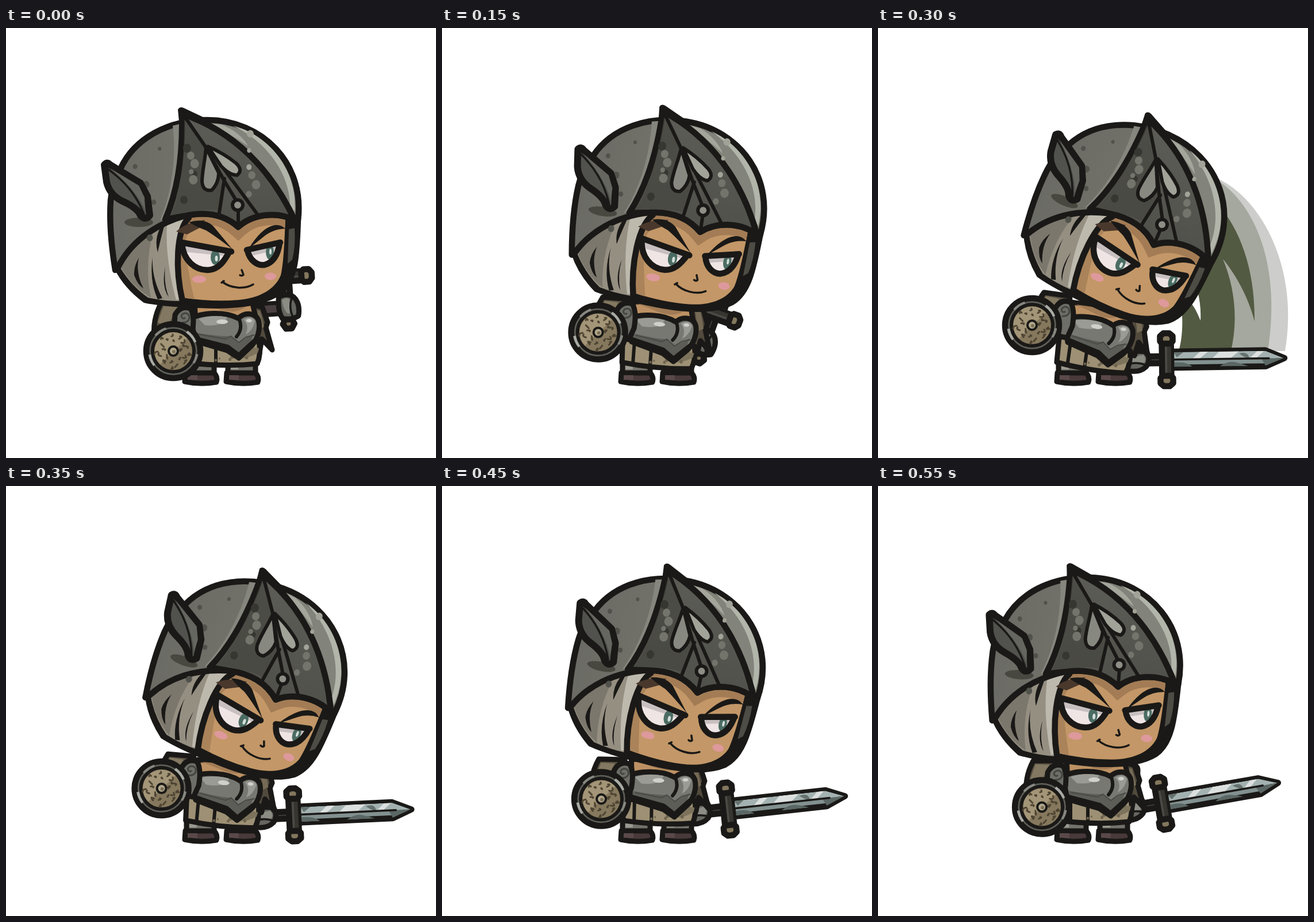
Recreate the animation shown at these times as an HTML page. Size 748 px wide and 748 px high, loop 600 ms.

```html
<!DOCTYPE html>
<html lang="en">
<head>
<meta charset="utf-8">
<title>Knight sword swing</title>
<style>
  html, body { margin: 0; width: 100%; height: 100%; overflow: hidden; background: #fff; }
  svg { display: block; width: 100vw; height: 100vh; }
  .o { stroke: #1a1917; stroke-width: var(--w, 9px); stroke-linejoin: round; stroke-linecap: round; }
  .l { fill: none; }
  .m { --w: 6px; }
  .s { --w: 3.5px; }
  .k { fill: #1a1917; }
  #head, #shield, #sword { --w: 10.5px; }
</style>
</head>
<body>
<svg viewBox="0 0 748 748">
  <defs>
    <linearGradient id="dome"><stop stop-color="#6b6b65"/><stop offset="1" stop-color="#7b7b71"/></linearGradient>
    <linearGradient id="crestFill" x2="0" y2="1"><stop stop-color="#5c5d56"/><stop offset="1" stop-color="#4f504a"/></linearGradient>
    <clipPath id="face"><path d="M318 325C296 350 295 420 307 469Q360 477 405 473C440 470 468 455 478 430Q484 405 486 325Z"/></clipPath>
    <clipPath id="bladeClip"><path d="M12-13H172L204 0L172 13H12Z"/></clipPath>
    <clipPath id="leftEye"><path d="M306 374C308 405 330 422 352 421C370 420 380 405 388 390Z"/></clipPath>
    <clipPath id="rightEye"><path d="M419 387C424 405 438 414 450 412C465 408 473 395 476 374Z"/></clipPath>
  </defs>

  <g id="slash">
    <path fill="#cdcecb" d="M588 261C660 290 734 410 708 562H600Z"/>
    <path fill="#a5a89e" d="M580 258C655 300 702 410 678 562H560Z"/>
    <path fill="#525a42" d="M590 305C630 350 656 420 655 510C645 470 622 428 600 402C620 450 627 505 614 562H523C530 540 532 500 525 470L540 475C550 482 555 495 561 509C562 490 560 475 556 458Z"/>
  </g>

  <g id="sword">
    <path class="o" fill="#45443f" d="M-78-6H0V6H-78Z"/>
    <path class="o" fill="#7d7159" d="M-90-5L-82-10L-74-6V6L-82 10L-90 5Z"/>
    <path class="o" fill="#82918f" d="M8-14H172L205 0L172 14H8Z"/>
    <g clip-path="url(#bladeClip)">
      <path fill="#a3b2b1" d="M12-13H172L204 0H12Z"/>
      <path fill="#dce0df" d="M44 0L58-13H72L56 0ZM78 0L92-13H126L110 0ZM144 0L158-13H170L155 0Z"/>
      <path fill="#5b6764" d="M12 5Q35 3 45 13H12ZM92 13Q106 3 119 6T142 13ZM165 0L204 0L172 13Z"/>
      <path fill="#66726f" d="M12-13H30L18-4ZM126-9Q140-13 143-4T126-9Z"/>
      <path class="o l s" d="M12 0H178"/>
    </g>
    <path class="o" fill="#4b4a45" d="M-8-34H8V34H-8Z"/>
    <path fill="#36352f" d="M1-30H8V30H1Z"/>
    <path id="cap" class="o" fill="#83775d" d="M-11-41L-5-46H5L11-41V-32L7-28H-7L-11-32Z"/>
    <use href="#cap" transform="scale(1 -1)"/>
  </g>

  <g id="arm">
    <path id="armEdge" class="o l" style="--w:27px"/>
    <path id="armFill" class="l" stroke="#493f41" stroke-width="13" stroke-linecap="round"/>
    <g id="hand">
      <path class="o" fill="#65665f" d="M-14-20Q2-27 12-18Q23-6 18 15Q7 22-10 18Q-18 5-14-20Z"/>
      <path fill="#8b8c84" d="M-9-14Q0-20 5-14L3 10Q-5 12-9-14Z"/>
      <path class="o l s" d="M8-16Q2 0 8 16"/>
    </g>
  </g>

  <g id="cape">
    <path class="o" fill="#5b5344" d="M270 478L315 478L330 550L259 545Q253 510 270 478Z"/>
    <path fill="#837861" d="M274 484L298 485L281 520L264 512Z"/>
    <path class="o" fill="#514a3d" d="M425 480L446 486L455 512L452 521L463 560L445 541L441 565L420 555Z"/>
    <path fill="#756a55" d="M432 490L442 492L449 520L440 525Z"/>
  </g>

  <g id="legs">
    <g id="leg">
      <path class="o" fill="#73736b" d="M314 565H362V601H314Z"/>
      <path fill="#9a9a91" d="M319 573H332V594H319Z"/>
      <path class="o" fill="#49393b" d="M312 600H362Q369 607 366 616Q338 621 311 615Z"/>
      <path fill="#5b494a" d="M316 604H333V612H316Z"/>
    </g>
    <use href="#leg" x="72"/>
  </g>

  <g id="torso">
    <path class="o" fill="#bd9163" d="M328 475H428L437 515H330Z"/>
    <path fill="#a17b55" d="M335 478H425Q405 500 373 490Z"/>
    <path class="o" fill="#9d9074" d="M314 536L440 545Q444 568 437 584Q380 590 316 582Z"/>
    <path fill="#7d735c" d="M338 544L440 557L438 565Q405 585 385 566Z"/>
    <path class="o l m" d="M365 550V584M335 545V582"/>
    <g id="skirtSpots"></g>
    <path class="o" fill="#777872" d="M321 506C340 494 382 493 404 505C417 493 434 496 439 508C444 525 436 542 429 551L405 574L385 561L330 545Z"/>
    <path fill="#5c5d57" d="M331 530Q370 537 392 536L405 547L430 532L425 549L405 564L385 552L332 541Z"/>
    <path class="o l m" d="M331 540L386 554L405 568L431 544M405 505Q413 523 401 537"/>
    <path class="l" stroke="#494a45" stroke-width="2" d="M336 533L382 541L391 536L405 547L417 538L432 534"/>
    <path fill="#9a9b94" d="M335 506Q360 498 385 503Q378 520 346 517ZM413 507Q428 499 433 510Q429 527 417 533Q424 518 413 507Z"/>
    <g fill="#d0d0ca"><ellipse cx="376" cy="511" rx="10" ry="4"/><ellipse cx="423" cy="509" rx="5" ry="3"/></g>
  </g>

  <g id="shoulder">
    <path class="o" fill="#6d6e67" d="M291 545L294 499Q304 481 321 488Q329 501 324 530L315 550Z"/>
    <path class="l" stroke="#44453f" stroke-width="3" d="M306 512C323 514 322 495 311 496C301 498 306 509 312 504"/>
  </g>

  <g id="shield">
    <circle class="o" r="47" fill="#5d5e58"/>
    <path class="l" stroke="#a9aba5" stroke-width="7" d="M23-33A40 40 0 0 1 37-15M-40 6A40 40 0 0 0-32 24"/>
    <path class="l" stroke="#868780" stroke-width="7" d="M-30-26A40 40 0 0 1-12-38M40 5A40 40 0 0 1 34 20"/>
    <circle class="o m" r="36" fill="#85785d"/>
    <path fill="#a39577" d="M-31-10A33 33 0 0 1 24-22L-23 23A33 33 0 0 1-31-10Z"/>
    <path id="vines" class="l" stroke="#4f4533" stroke-width="3" stroke-linecap="round"/>
    <circle class="o" style="--w:4px" r="8" fill="#b2a88c"/>
    <circle cx="1" cy="1" r="3" fill="#7b7058"/>
  </g>

  <g id="head">
    <path class="o k" d="M194 418Q210 449 242 473Q275 480 340 482C400 485 450 478 478 458C503 437 506 400 508 330L330 300L230 340Z"/>
    <path fill="#958f82" d="M198 416C224 370 268 335 317 325C294 365 293 420 304 475Q274 475 247 469Q218 449 198 416Z"/>
    <path fill="#7c776c" d="M200 416Q225 376 257 352Q240 410 252 469Q218 449 200 416Z"/>
    <path fill="#bdb9ad" d="M280 340L315 328C294 365 293 420 304 472L296 473C282 420 278 380 280 340Z"/>
    <path class="k" d="M267 350Q258 370 264 390Q267 375 275 345ZM255 398Q253 435 272 470L264 472Q249 440 255 398ZM231 400Q225 425 239 453Q229 447 223 430Q222 415 231 400ZM277 415Q274 445 283 468Q270 450 277 415Z"/>
    <path fill="#4d4c45" d="M492 350L502 348Q504 380 498 403L490 410Z"/>

    <g clip-path="url(#face)">
      <path fill="#c39767" d="M290 320H510V490H290Z"/>
      <path fill="#aa835a" d="M290 320H330L310 375Q317 430 332 490H290Z"/>
      <path fill="none" stroke="#a37c55" stroke-width="36" d="M310 327C350 318 380 325 404 346C428 324 470 318 502 334"/>
    </g>
    <path class="o l" d="M318 330C296 352 294 420 307 475"/>

    <g clip-path="url(#leftEye)">
      <path fill="#eee5e4" d="M300 365H395V425H300Z"/>
      <path fill="#c8c0c0" d="M300 365L395 385V398L305 389Z"/>
      <ellipse cx="364" cy="399" rx="8" ry="13" fill="#4b6c63"/><ellipse cx="366" cy="401" rx="2.5" ry="5" fill="#d5dfda"/>
    </g>
    <g clip-path="url(#rightEye)">
      <path fill="#eee5e4" d="M415 365H480V415H415Z"/>
      <path fill="#c8c0c0" d="M415 385L480 368V384L420 398Z"/>
      <ellipse cx="459" cy="390" rx="7" ry="13" fill="#4b6c63"/><ellipse cx="460" cy="389" rx="2" ry="5" fill="#d5dfda"/>
    </g>
    <path class="o l" d="M305 373L392 389M306 374C308 405 330 422 352 421C370 420 380 405 388 390M419 386L477 373M420 387C424 405 438 414 450 412C465 408 473 395 476 374"/>
    <path fill="#4a382c" d="M296 354Q315 337 346 334L340 346L315 359Z"/>
    <path class="k" d="M318 338Q344 330 360 344L394 385Q363 361 348 352Q334 347 318 338ZM422 384Q443 350 463 344Q476 340 486 349Q463 350 447 364Z"/>
    <g fill="#dd999b"><ellipse cx="336" cy="437" rx="12" ry="6.5"/><ellipse cx="460" cy="432" rx="10" ry="6.5"/></g>
    <path class="o l s" d="M410 421L413 429Q411 432 407 430M375 443L379 440M377 442C391 453 415 455 430 446"/>

    <path class="o" fill="url(#dome)" d="M190 421C185 390 179 345 182 300C184 278 191 258 199 245C224 190 285 160 350 160C445 160 520 235 508 334L502 334C470 318 428 324 404 346C380 325 350 318 310 327C255 343 215 375 194 418Z"/>
    <path fill="#85867d" d="M290 170L302 167C306 225 298 285 277 331L268 334C287 290 297 230 290 170Z"/>
    <path fill="#82837a" d="M345 165C435 165 502 230 503 322C468 250 412 195 345 165Z"/>
    <path fill="#b2b5aa" d="M395 170C455 185 508 245 502 320L494 308C493 255 456 199 395 170Z"/>
    <path fill="#a4a59b" d="M350 165L375 168Q407 181 421 205Q390 184 350 165Z"/>
    <path class="o" fill="url(#crestFill)" d="M306 148C308 225 298 285 277 333L310 327C350 318 380 325 404 346C428 324 470 318 502 334C470 265 415 192 322 155Z"/>
    <path fill="#454640" d="M310 158L346 205L376 266L370 316Q330 315 287 326C303 290 311 225 310 158Z" opacity=".65"/>
    <g id="headSpots"></g>
    <path class="o l m" d="M310 153L346 205L381 268L404 306V342M380 262L371 321M362 222L438 325"/>
    <path class="o m" fill="#878880" d="M348 208C346 233 341 249 341 268Q343 285 358 282Q370 270 370 252Z"/>
    <path class="o m" fill="#a1a399" d="M351 206Q379 218 400 235Q413 247 402 256Q389 256 374 240Z"/>
    <circle class="o m" cx="403" cy="308" r="9" fill="#8d8e86"/>
    <path class="k" d="M299 142Q302 136 309 139L345 156L312 158L302 172Z"/>
    <ellipse cx="231" cy="338" rx="25" ry="8" fill="#484841"/>
    <path class="o" style="--w:12px" fill="#51524d" d="M171 238Q176 232 181 238L234 270L246 293L250 326Q242 336 234 326Q229 313 202 301Q180 290 175 268Z"/>
    <path fill="#656660" d="M181 244L231 274L241 295L242 317Q227 282 181 244Z"/>
    <path class="o l s" d="M178 246Q222 277 240 324"/>
  </g>
</svg>
<script>
  const $ = id => document.getElementById(id);
  const lerp = (a, b, u) => a + (b - a) * u;
  const clamp = u => Math.min(1, Math.max(0, u));
  const smooth = u => (u = clamp(u)) * u * (3 - 2 * u);

  let seed = 7;
  const random = (a, b) => lerp(a, b, (seed = seed * 16807 % 2147483647) / 2147483647);

  // Spots climb the area in even steps and scatter sideways
  function scatter(id, color, count, x, y, w, h, size) {
    for (let i = 0; i < count; i++) {
      const r = random(.6, 1.3) * size;
      $(id).innerHTML += `<ellipse cx="${x + random(0, w)}" cy="${y + h * i / (count - 1)}" rx="${r}" ry="${r * 1.1}" fill="${color}"/>`;
    }
  }
  scatter('headSpots', '#51524b', 6, 212, 210, 60, 155, 5);
  scatter('headSpots', '#363731', 3, 308, 209, 28, 90, 6);
  scatter('headSpots', '#73746b', 4, 312, 222, 20, 42, 6);
  scatter('headSpots', '#73746b', 3, 415, 256, 22, 33, 6);
  scatter('headSpots', '#a2a398', 3, 405, 184, 60, 58, 5);
  scatter('skirtSpots', '#6d634e', 5, 350, 572, 78, 6, 2.5);

  let vines = '';
  for (let i = 0; i < 22; i++) {
    const turn = i * 2.4, r = 12 + 17 * Math.sqrt(i / 22);
    vines += `M${r * Math.cos(turn)} ${r * Math.sin(turn)}q${random(-8, 8)} ${random(-8, 8)} ${random(-6, 6)} ${random(-6, 6)}`;
  }
  $('vines').setAttribute('d', vines);

  // Sword poses: guard x, y and blade angle
  const raised = [486, 433, -94], wound = [446, 417, -140], struck = [502, 577, -.8], lowered = [494, 552, -10];
  const blend = (a, b, u) => a.map((v, i) => lerp(v, b[i], u));

  function swordPose(t) {
    if (t <= 100) return blend(raised, wound, t / 100);
    if (t <= 200) return blend(wound, struck, (t - 100) / 100);
    return blend(struck, lowered, clamp((t - 300) / 250));
  }

  const move = (id, value) => $(id).setAttribute('transform', value);

  function draw(now) {
    const t = Math.floor(now % 600 / 50) * 50;
    const back = 1 - clamp((t - 300) / 300) ** 1.1;
    const nod = smooth((t - 60) / 210) * back;
    const slide = smooth((t - 20) / 240) * back;
    const lunge = clamp(t / 200) ** .75 * back;
    const lean = lunge ** 3, lift = lunge ** 1.5;
    const [x, y, turn] = swordPose(t);
    const r = turn * Math.PI / 180;
    const hx = x - 54 * Math.cos(r), hy = y - 54 * Math.sin(r);
    const tilt = `translate(${-7 * lean} ${11 * lean}) rotate(${8 * lean} 400 590)`;

    move('head', `translate(${403 + 91 * slide} ${308 + 34 * nod ** 1.4}) rotate(${23.5 * nod}) translate(-403 -308)`);
    move('torso', tilt);
    move('cape', `translate(${9 * lean} ${-12 * lean}) ${tilt}`);
    move('shoulder', `translate(${14 * lift} ${-11 * lift})`);
    move('shield', `translate(${291 - 23 * lunge ** .8} ${562 - 45 * lift})`);
    move('sword', `translate(${x} ${y}) rotate(${turn})`);
    move('hand', `translate(${hx} ${hy}) rotate(${turn + 90})`);
    for (const id of ['armEdge', 'armFill']) $(id).setAttribute('d', `M443 ${490 + 50 * lift}L${hx} ${hy}`);
    $('slash').style.display = t >= 200 && t < 350 ? '' : 'none';
    requestAnimationFrame(draw);
  }
  draw(performance.now());
</script>
</body>
</html>
```
